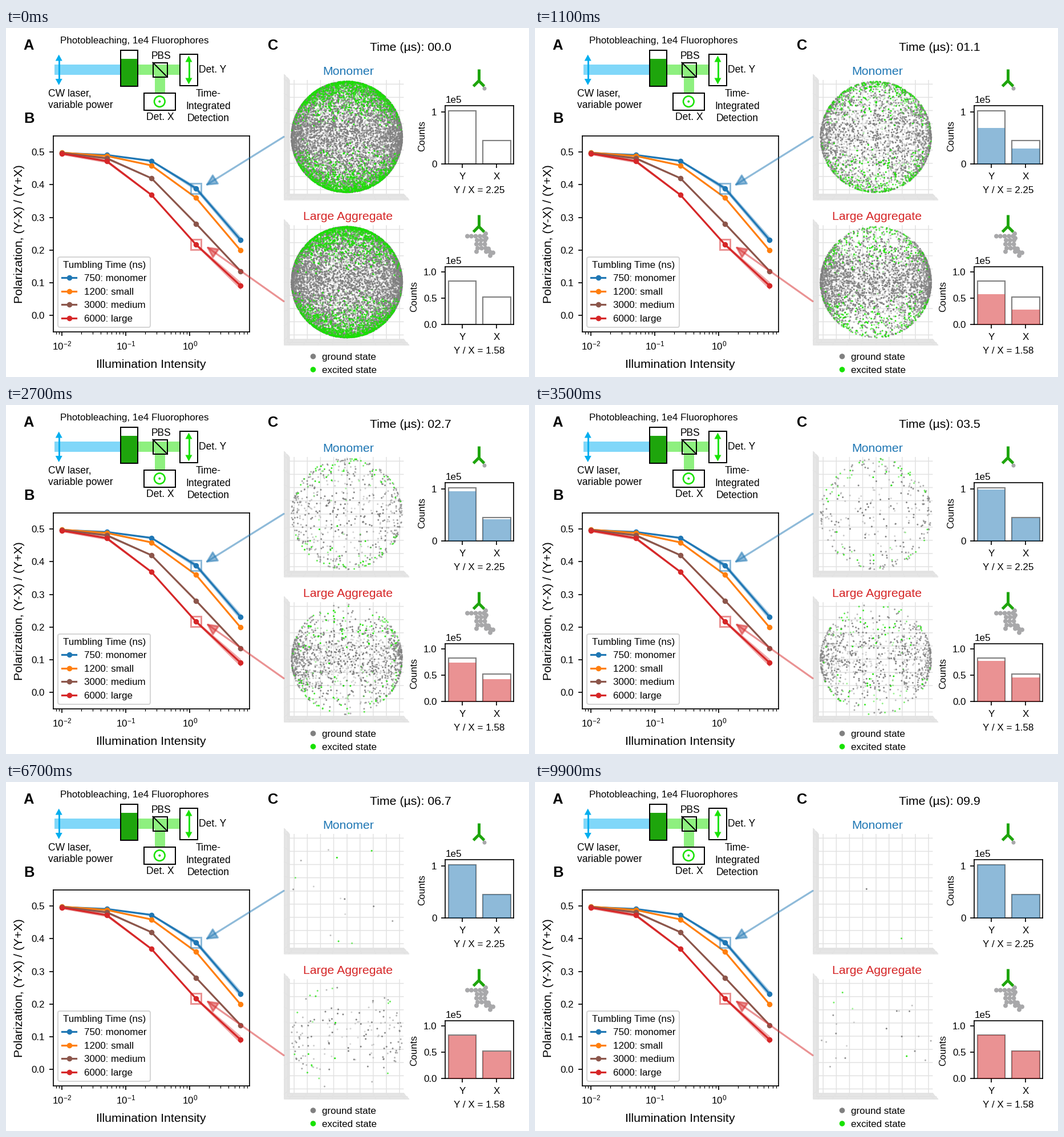
A matplotlib script for the animation above (10 s loop, 917 by 611 pixels).

```python
import numpy as np
import matplotlib.pyplot as plt
from matplotlib.animation import FuncAnimation
from matplotlib.collections import LineCollection
from matplotlib.patches import Circle, FancyArrowPatch, Polygon, Rectangle

W, H, DPI = 917, 611, 128
U = W / 6 / DPI          # layout is designed on a 6 inch wide page
PX = 72 / DPI            # one pixel in points
FRAMES, DT = 100, 0.1

BLUE, ORANGE, BROWN, RED = "#1f77b4", "#ff7f0e", "#8c564b", "#d62728"
LASER, LIME, DYE = "#00aeef", "#18e200", "#1ea50c"

plt.rcParams.update({
    "font.family": "Liberation Sans", "font.size": 8 * U,
    "axes.linewidth": 0.8 * U, "lines.linewidth": 1.5 * U,
    "lines.markersize": 3.5 * U, "lines.markeredgewidth": U,
    "patch.linewidth": U,
})
for axis in ("xtick", "ytick"):
    plt.rcParams.update({
        f"{axis}.labelsize": 8 * U,
        f"{axis}.major.size": 3.5 * U, f"{axis}.major.width": 0.8 * U,
        f"{axis}.minor.size": 2 * U, f"{axis}.minor.width": 0.6 * U,
        f"{axis}.major.pad": 3.5 * U, f"{axis}.minor.pad": 3.4 * U,
    })

fig = plt.figure(figsize=(W / DPI, H / DPI), dpi=DPI, facecolor="white")


def axes_px(x0, y0, x1, y1):
    return fig.add_axes([x0 / W, 1 - y1 / H, (x1 - x0) / W, (y1 - y0) / H])


# Pixel canvas with y pointing down, above every plot
page = fig.add_axes([0, 0, 1, 1], zorder=5)
page.set(xlim=(0, W), ylim=(H, 0))
page.axis("off")


def label(x, y, s, size=8, ha="center", **kw):
    kw.setdefault("va", "baseline")
    return page.text(x, y, s, fontsize=size * U, ha=ha, **kw)


def rect(x0, y0, x1, y1, face="none", edge="none", lw=2, **kw):
    page.add_patch(Rectangle((x0, y0), x1 - x0, y1 - y0, facecolor=face,
                             edgecolor=edge, linewidth=lw * PX, **kw))


def line(xs, ys, color, lw, **kw):
    page.plot(xs, ys, color=color, lw=lw * PX, **kw)


def dot(x, y, r, color, **kw):
    kw = {"linewidth": 0, "zorder": 3, **kw}
    page.add_patch(Circle((x, y), r, facecolor=color, **kw))


def double_arrow(x, y0, y1, color):
    line([x, x], [y0 + 8, y1 - 8], color, 3, zorder=3)
    for tip, back in ((y0, y0 + 11), (y1, y1 - 11)):
        page.add_patch(Polygon([(x, tip), (x - 6, back), (x + 6, back)],
                               facecolor=color, linewidth=0, zorder=3))


# ---- A: optical setup ----
def draw_setup():
    fs = 8.25
    label(39.7, 38, "A", 12, weight="bold")
    label(225.3, 27, "Photobleaching, 1e4 Fluorophores")
    rect(85, 64, 200, 81.5, "#80d7f9")
    rect(230, 64, 305, 81.5, "#8ef07f")
    rect(261, 73, 278.5, 114, "#8ef07f")
    double_arrow(92.7, 46.5, 100, LASER)
    rect(200.5, 38.5, 230.5, 102, "white")
    rect(200.5, 54, 230.5, 102, DYE)
    rect(200.5, 38.5, 230.5, 102, edge="black")
    rect(257.5, 60.5, 283, 86, edge="black")
    line([257.5, 283], [60.5, 86], "black", 2)
    rect(305, 45.5, 336, 101, "white", "black")
    double_arrow(320.5, 48.5, 98.5, LIME)
    rect(242, 113.5, 297, 143.5, "white", "black")
    dot(269.3, 128.7, 9.3, "none", edgecolor=LIME, linewidth=2.6 * PX)
    dot(269.3, 128.7, 2, LIME)
    label(271.7, 53.5, "PBS", fs)
    label(338.5, 78, "Det. Y", fs, "left")
    label(270, 161, "Det. X", fs)
    for y, s in zip((120.3, 142, 163.3), ("Time-", "Integrated", "Detection")):
        label(354.8, y, s, fs)
    label(73.5, 119, "CW laser,", fs, "left")
    label(73.5, 140, "variable power", fs, "left")


# ---- B: polarization curves ----
CURVES = [
    ("750: monomer", BLUE, [.497, .491, .473, .389, .231], [.003, .002, .003, .007, .010]),
    ("1200: small", ORANGE, [.498, .488, .459, .360, .199], [.004, .002, .001, .001, .002]),
    ("3000: medium", BROWN, [.497, .481, .420, .281, .136], [.004, .004, .002, .003, .002]),
    ("6000: large", RED, [.495, .472, .369, .217, .091], [.004, .005, .003, .004, .012]),
]


def draw_curves():
    ax = axes_px(82.7, 188.5, 427, 532)
    power = 0.01 * 5.0 ** np.arange(5)
    for name, color, mean, err in CURVES:
        mean, err = np.array(mean), np.array(err)
        ax.fill_between(power, mean - err, mean + err, color=color,
                        alpha=0.4, linewidth=0)
        ax.plot(power, mean, "o-", color=color, label=name)
    pad = 0.05 * np.log10(625)
    ax.set_xscale("log")
    ax.set(xlim=(10 ** (-2 - pad), 6.25 * 10 ** pad), ylim=(-0.05, 0.55))
    ax.legend(loc="lower left", title="Tumbling Time (ns)", handlelength=1.5)
    label(40.3, 166, "B", 12, weight="bold")
    label(254.5, 595, "Illumination Intensity", 10)
    label(23.7, 360.5, "Polarization, (Y-X) / (Y+X)", 10, rotation=90, va="center")
    for y, color, start, tip in ((281, BLUE, (487, 190.5), (349.5, 276)),
                                 (379.3, RED, (487, 478.5), (351, 382.5))):
        rect(323.8, y - 9, 341.8, y + 9, edge=color, lw=3, alpha=0.5)
        page.add_patch(FancyArrowPatch(
            start, tip, arrowstyle="-|>", mutation_scale=20 * U, color=color,
            alpha=0.5, lw=1.5 * U, shrinkA=0, shrinkB=0))


# ---- C: spheres, icons, counts ----
RADIUS, EYE, BOX = 97, 21.6, 1.08
CX = 597.6


def project(p, cy):
    """Perspective view: x right, y towards the viewer, z up."""
    p = np.asarray(p, float)
    s = RADIUS * EYE / (EYE - p[..., 1])
    return np.stack([CX + s * p[..., 0], cy - s * p[..., 2]], axis=-1)


def draw_box(cy):
    b = BOX
    floor = [(-b, b, -b), (-b, -b, -b), (b, -b, -b), (b, b, -b)]
    wall = [(-b, b, -b), (-b, -b, -b), (-b, -b, b), (-b, b, b)]
    for pane, shade in ((floor, "#f3f3f3"), (wall, "#f8f8f8")):
        page.add_patch(Polygon(project(pane, cy), facecolor=shade,
                               linewidth=0, zorder=0.5))
    segs = []
    for t in np.linspace(-1, 1, 9):
        segs += [
            [(t, -b, b), (t, -b, -b), (t, b, -b)],
            [(b, -b, t), (-b, -b, t), (-b, b, t)],
            [(b, t, -b), (-b, t, -b), (-b, t, b)],
        ]
    page.add_collection(LineCollection(project(segs, cy), colors="#e2e2e2",
                                       linewidths=1.5 * PX, zorder=0.6))


def unit(v):
    return v / np.linalg.norm(v, axis=1, keepdims=True)


def simulate(tau, cy, seed, count=10000, bleach=5.4):
    """Tumbling dipoles, excited by vertical light until they bleach."""
    rng = np.random.default_rng(seed)
    step = np.sqrt(DT / tau)
    v = unit(rng.normal(size=(count, 3)))
    shots = []
    for _ in range(FRAMES):
        c2 = v[:, 2] ** 2
        p = c2 / (1 + c2)
        lit = rng.random(len(v)) < p
        order = np.lexsort((v[:, 1], lit))
        rgba = np.where(lit[:, None], (0.094, 0.886, 0, 1), (0.5, 0.5, 0.5, 1))
        rgba[:, 3] = 0.65 + 0.35 * v[:, 1]
        shots.append((project(v, cy)[order], rgba[order]))
        v = v[rng.random(len(v)) < np.exp(-bleach * p * DT)]
        v = unit(v + step * rng.normal(size=v.shape))
    return shots


def antibody(x, y):
    line([x, x], [y, y + 21], DYE, 5, solid_capstyle="butt", zorder=4)
    line([x - 9.5, x, x + 9.5], [y + 30, y + 20.5, y + 30], DYE, 5,
         solid_capstyle="butt", zorder=4)


def aggregate():
    rows = {360: [841], 364.5: [809, 816, 823.5, 831, 838],
            371.5: [826, 833, 840], 378.5: [825, 832, 839.5],
            385.5: [827, 834, 841], 391.5: [825, 842, 848],
            393.5: [854], 398.5: [849], 368: [842], 386.5: [846]}
    for y, xs in rows.items():
        for x in xs:
            dot(x, y, 4, "#a8a8aa")


def draw_counts(y0, y1, top, ticks, totals, color, label_x):
    ax = axes_px(770.3, y0, 890, y1)
    ax.bar([0, 1], totals, facecolor="none", edgecolor="gray", lw=U, zorder=2)
    bars = ax.bar([0, 1], [0, 0], color=color, alpha=0.5, linewidth=0, zorder=3)
    ax.set(xlim=(-0.49, 1.49), ylim=(0, top), yticks=ticks)
    ax.set_xticks([0, 1], ["Y", "X"])
    ax.ticklabel_format(axis="y", style="sci", scilimits=(0, 0))
    label(label_x, (y0 + y1) / 2 + 1.5, "Counts", rotation=90, va="center")
    label(829.5, y1 + 51, f"Y / X = {2.25 if color == BLUE else 1.58}")
    return bars


def emitted(t, slow_share, slow, fast):
    return 1 - slow_share * np.exp(-slow * t) - (1 - slow_share) * np.exp(-fast * t)


draw_setup()
draw_curves()

label(468.5, 38, "C", 12, weight="bold")
clock = label(638.5, 39.5, "", 10, "left")
label(600, 82, "Monomer", 10, color=BLUE)
label(600, 336, "Large Aggregate", 10, color=RED)
for y, color, s in ((575, "gray", "ground state"), (598, LIME, "excited state")):
    dot(538.5, y, 4.8, color)
    label(553.5, y + 5.5, s, ha="left")

antibody(829, 72)
dot(839, 106, 3.5, "#a8a8aa")
antibody(829, 327)
aggregate()

CENTERS = (190.7, 445)
clouds = []
for cy, tau, seed in zip(CENTERS, (0.75, 6.0), (3, 8)):
    draw_box(cy)
    sc = page.scatter([], [], s=(3 * PX) ** 2, linewidths=0, zorder=2)
    clouds.append((sc, simulate(tau, cy, seed)))

# Bars: final counts and decay (slow share, slow rate, fast rate)
charts = [
    (draw_counts(136.5, 238, 1.115e5, [0, 1e5], (1.02e5, 0.455e5), BLUE, 730),
     (1.02e5, 0.455e5), ((1, 1.03, 1), (1, 0.96, 1))),
    (draw_counts(418, 519, 1.10e5, [0, 0.5e5, 1e5], (0.83e5, 0.526e5), RED, 716),
     (0.83e5, 0.526e5), ((0.5, 0.55, 2.4), (0.84, 0.55, 3.5))),
]


def update(i):
    t = i * DT
    clock.set_text(f"Time (µs): {t:04.1f}")
    for sc, shots in clouds:
        xy, rgba = shots[i]
        sc.set_offsets(xy)
        sc.set_facecolors(rgba)
    for bars, totals, decays in charts:
        for bar, total, decay in zip(bars, totals, decays):
            bar.set_height(total * emitted(t, *decay))
    return []


anim = FuncAnimation(fig, update, frames=FRAMES, interval=100,
                     repeat=True, repeat_delay=0, blit=False)
plt.show()
```
